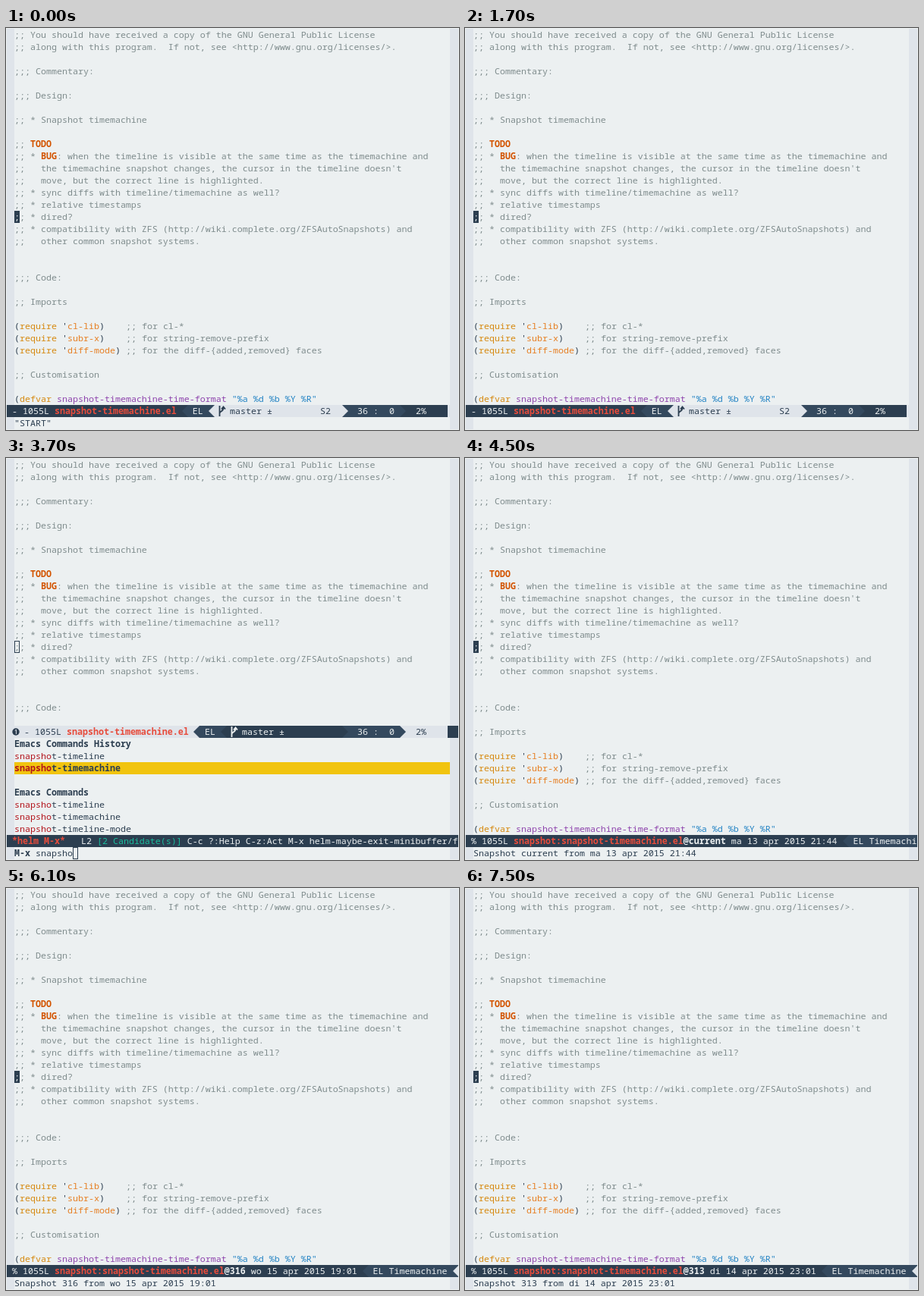
Animation, 597 px wide and 530 px high, one loop 8000 ms. Source, as an HTML page:

```html
<!DOCTYPE html>
<html lang="en">
<head>
<meta charset="utf-8">
<title>Snapshot timemachine</title>
<style>
  html, body { margin: 0; width: 100%; height: 100%; overflow: hidden; background: #ecf0f1; }
  svg { display: block; }
  text {
    font: 11.667px "Noto Sans Mono", "DejaVu Sans Mono", monospace;
    white-space: pre; fill: #2c3e50;
  }
  .light { fill: #ecf0f1; }
  .note { fill: #7f8c8d; }
  .todo { fill: #d35400; font-weight: bold; }
  .key { fill: #d68910; }
  .const { fill: #e67e22; }
  .var { fill: #8e44ad; }
  .str { fill: #2383c4; }
  .file { fill: #e74c3c; font-weight: bold; }
  .match { fill: #b3141c; }
  .count { fill: #1abc9c; }
  .b { font-weight: bold; }

  .layer { opacity: 0; animation: 8s step-end infinite; }
  #start { animation-name: start; }
  #edit { animation-name: edit; }
  #code { animation-name: code; }
  #helm { animation-name: helm; }
  #current { animation-name: current; }
  #snap316 { animation-name: snap316; }
  #snap315 { animation-name: snap315; }
  #snap313 { animation-name: snap313; }
  @keyframes start { 0% { opacity: 1 } 6.25%, 100% { opacity: 0 } }
  @keyframes edit { 0% { opacity: 1 } 31.25%, 100% { opacity: 0 } }
  @keyframes code { 0%, 56.25%, 100% { opacity: 1 } 31.25% { opacity: 0 } }
  @keyframes helm { 0%, 56.25%, 100% { opacity: 0 } 31.25% { opacity: 1 } }
  @keyframes current { 0%, 68.75%, 100% { opacity: 0 } 56.25% { opacity: 1 } }
  @keyframes snap316 { 0%, 81.25%, 100% { opacity: 0 } 68.75% { opacity: 1 } }
  @keyframes snap315 { 0%, 93.75%, 100% { opacity: 0 } 81.25% { opacity: 1 } }
  @keyframes snap313 { 0% { opacity: 0 } 93.75%, 100% { opacity: 1 } }
</style>
</head>
<body>
<svg id="stage" width="597" height="530" viewBox="0 0 597 530"></svg>
<script>
const CHAR = 7, ROW = 16, LEFT = 11;
const DARK = '#2c3e50', MID = '#34495e', PALE = '#dfe4ea', PAPER = '#ecf0f1';

const rowY = row => 1 + row * ROW;
const span = (cls, s) => `<tspan class="${cls}">${s}</tspan>`;
const text = (row, x, s, cls = '') => `<text x="${x}" y="${rowY(row) + 12}" class="${cls}">${s}</text>`;
const lines = (row, list, cls) => list.map((s, i) => s && text(row + i, LEFT, s, cls)).join('');
const rect = (x, y, w, h, fill) => `<rect x="${x}" y="${y}" width="${w}" height="${h}" fill="${fill}"/>`;
const bar = (row, fill) => rect(1, rowY(row), 595, ROW, fill);
const layer = (id, s) => `<g id="${id}" class="layer">${s}</g>`;

// Mode line segment with a pointed tip at each end
function segment(row, a, b, fill) {
  const y = rowY(row);
  return `<path fill="${fill}" d="M${a} ${y + 8}L${a + 8} ${y}H${b - 8}L${b} ${y + 8}L${b - 8} ${y + ROW}H${a + 8}Z"/>`;
}

function branch(row, x, color) {
  return `<path transform="translate(${x} ${rowY(row)})" fill="none" stroke="${color}" stroke-width="1.8"
    d="M2.5 1V15M2.5 11C2.5 8 7.5 9 7.5 4M5 5.5L7.5 2.5L10 5.5"/>`;
}

function hollow(row, col) {
  return `<rect x="${LEFT + col * CHAR + .5}" y="${rowY(row) + .5}" width="6" height="15" fill="none" stroke="${DARK}"/>`;
}

const solidCursor = rect(LEFT, rowY(15), CHAR, ROW, DARK) + text(15, LEFT, ';', 'light');

const comments = lines(0, [
  ';; You should have received a copy of the GNU General Public License',
  ';; along with this program.  If not, see &lt;http://www.gnu.org/licenses/&gt;.',
  '',
  ';;; Commentary:',
  '',
  ';;; Design:',
  '',
  ';; * Snapshot timemachine',
  '',
  ';; ' + span('todo', 'TODO'),
  ';; * ' + span('todo', 'BUG') + ': when the timeline is visible at the same time as the timemachine and',
  ';;   the timemachine snapshot changes, the cursor in the timeline doesn\'t',
  ';;   move, but the correct line is highlighted.',
  ';; * sync diffs with timeline/timemachine as well?',
  ';; * relative timestamps',
  ';; * dired?',
  ';; * compatibility with ZFS (http://wiki.complete.org/ZFSAutoSnapshots) and',
  ';;   other common snapshot systems.',
  '',
  '',
  ';;; Code:'
], 'note');

const required = (lib, gap, why) =>
  `(${span('key', 'require')} '${span('const', lib)})${gap}${span('note', ';; for ' + why)}`;

const code = lines(22, [
  span('note', ';; Imports'),
  '',
  required('cl-lib', '    ', 'cl-*'),
  required('subr-x', '    ', 'string-remove-prefix'),
  required('diff-mode', ' ', 'the diff-{added,removed} faces'),
  '',
  span('note', ';; Customisation'),
  '',
  `(${span('key', 'defvar')} ${span('var', 'snapshot-timemachine-time-format')} ${span('str', '"%a %d %b %Y %R"')}`
]) + solidCursor;

const FILE = 'snapshot-timemachine.el';

const edit = bar(31, DARK) + rect(582, rowY(31), 14, ROW, PALE) +
  segment(31, 232, 527, MID) + segment(31, 267, 451, PALE) +
  text(31, 8, '- 1055L ' + span('file', FILE) + '   EL', 'light') +
  branch(31, 279, DARK) + text(31, 295, 'master ±') + text(31, 414, 'S2') +
  text(31, 463, '36 :  0', 'light') + text(31, 540, '2%', 'light');

const candidate = rest => span('match', 'snapsho') + rest;

const helm = hollow(15, 0) +
  bar(22, PALE) + rect(582, rowY(22), 14, ROW, DARK) +
  segment(22, 247, 527, MID) + segment(22, 283, 451, DARK) +
  `<circle cx="13" cy="${rowY(22) + 8}" r="4.7" fill="${DARK}"/>` +
  `<path d="M11.8 ${rowY(22) + 6.4}L13.4 ${rowY(22) + 5.2}V${rowY(22) + 11}" fill="none" stroke="${PALE}"/>` +
  text(22, 24, '- 1055L ' + span('file', FILE)) +
  text(22, 262, 'EL', 'light') + branch(22, 295, PAPER) +
  text(22, 311, 'master ±', 'light') + text(22, 463, '36 :  0', 'light') + text(22, 540, '2%') +
  rect(LEFT, rowY(25), 574, ROW, '#f1c40f') +
  lines(23, [
    span('b', 'Emacs Commands History'),
    candidate('t-timeline'),
    span('b', candidate('t-timemachine')),
    '',
    span('b', 'Emacs Commands'),
    candidate('t-timeline'),
    candidate('t-timemachine'),
    candidate('t-timeline-mode')
  ]) +
  bar(31, DARK) +
  text(31, 8, span('file', '*helm M-x*') + '   L2 ' + span('count', '[2 Candidate(s)]') +
    ' C-c ?:Help C-z:Act M-x helm-maybe-exit-minibuffer/f', 'light') +
  text(32, LEFT, span('b', 'M-x') + ' snapsho') + hollow(32, 11);

function snapshot(id, date) {
  const end = 295 + (id.length + 1 + date.length) * CHAR;
  return bar(31, DARK) + segment(31, end + 7, 640, MID) + segment(31, end + 126, 760, PALE) +
    text(31, 8, '% 1055L ' + span('file', 'snapshot:' + FILE) + span('b', '@' + id) +
      ` ${date}   EL Timemachine`, 'light') +
    text(32, LEFT, `Snapshot ${id} from ${date}`);
}

document.getElementById('stage').innerHTML =
  rect(0, 0, 597, 530, PAPER) + rect(1, 1, 10, 528, PALE) + rect(585, 1, 11, 528, PALE) +
  comments +
  layer('code', code) +
  layer('edit', edit) +
  layer('start', text(32, LEFT, '"START"')) +
  layer('helm', helm) +
  layer('current', snapshot('current', 'ma 13 apr 2015 21:44')) +
  layer('snap316', snapshot('316', 'wo 15 apr 2015 19:01')) +
  layer('snap315', snapshot('315', 'wo 15 apr 2015 18:01')) +
  layer('snap313', snapshot('313', 'di 14 apr 2015 23:01')) +
  rect(596, 0, 1, 530, PAPER);
</script>
</body>
</html>
```
